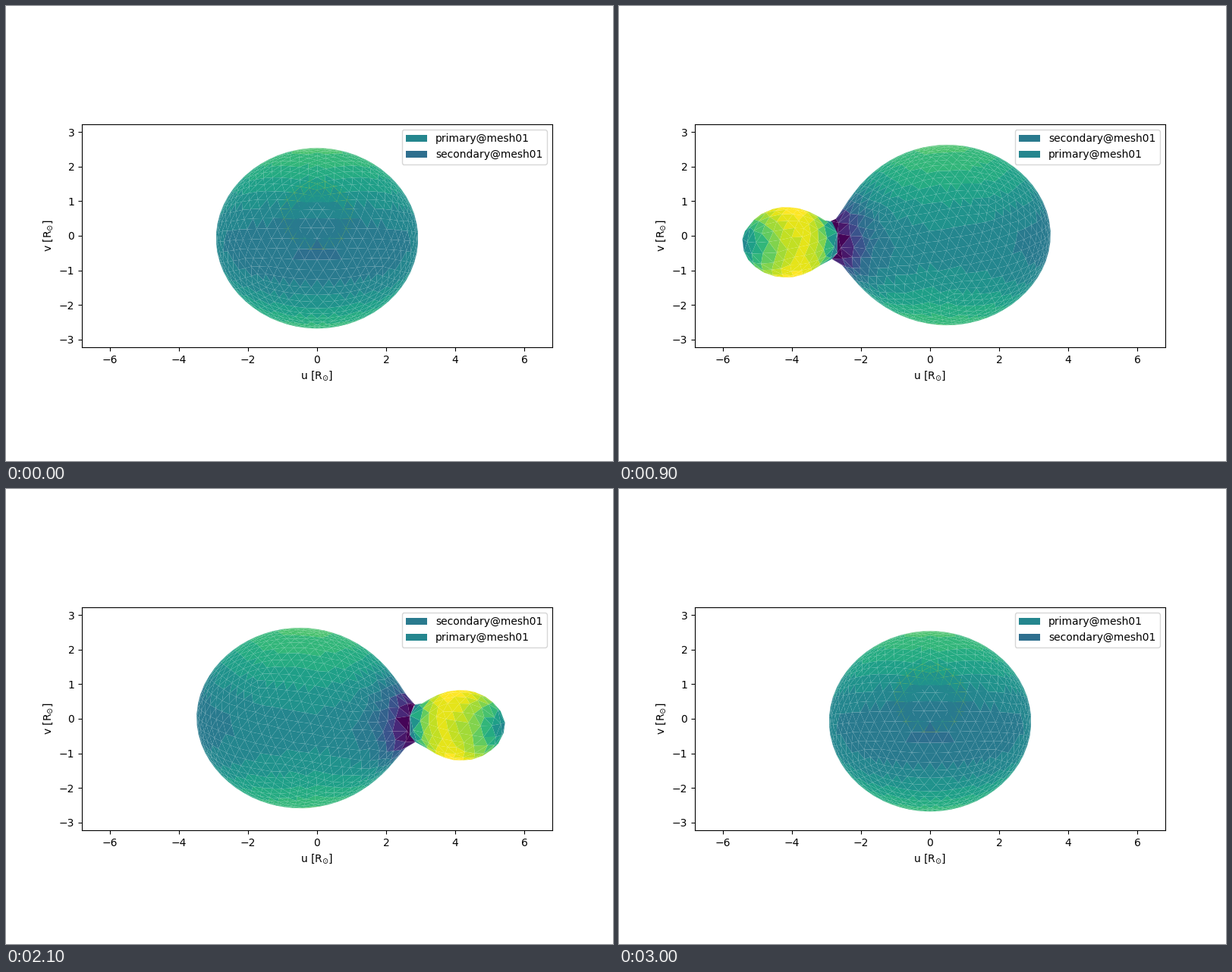
A matplotlib script for the animation above (3.1 s loop, 800 by 600 pixels).

```python
from itertools import combinations

import matplotlib.pyplot as plt
import numpy as np
from matplotlib.animation import FuncAnimation
from matplotlib.collections import PolyCollection
from matplotlib.patches import Patch

FRAMES = 31
STEPS = 30            # frames per orbit
SEP = 4.83            # separation in solar radii
Q = 0.112             # mass ratio, small star / big star
OMEGA = 1.95          # potential of the common envelope
NECK = 0.72           # where the envelope is split in two
INCL = np.radians(82)
CMAP = plt.get_cmap("viridis")


def potential(p):
    x, y, z = p.T
    r1 = np.sqrt(x**2 + y**2 + z**2)
    r2 = np.sqrt((x - 1)**2 + y**2 + z**2)
    return 1 / r1 + Q / r2 - Q * x + 0.5 * (1 + Q) * (x**2 + y**2)


def gravity(p):
    x, y, z = p.T
    k1 = (x**2 + y**2 + z**2)**-1.5
    k2 = Q * ((x - 1)**2 + y**2 + z**2)**-1.5
    spin = 1 + Q
    gx = -x * k1 - (x - 1) * k2 - Q + spin * x
    gy = y * (spin - k1 - k2)
    gz = -z * (k1 + k2)
    return np.sqrt(gx**2 + gy**2 + gz**2)


def reach(origin, rays, limit):
    """Distance along each ray to the envelope, at most limit."""
    lo, hi = np.zeros(len(rays)), limit.copy()
    for _ in range(40):
        mid = (lo + hi) / 2
        inside = potential(origin + mid[:, None] * rays) > OMEGA
        lo, hi = np.where(inside, mid, lo), np.where(inside, hi, mid)
    return hi


def sphere(n, rng):
    """Geodesic sphere, regular at -x and slightly uneven elsewhere."""
    g = (1 + 5**0.5) / 2
    base = [np.roll((0, s, t * g), k)
            for k in range(3) for s in (-1, 1) for t in (-1, 1)]
    points, faces = [], []
    for a, b, c in combinations(base, 3):
        if max(np.linalg.norm(a - b), np.linalg.norm(b - c),
               np.linalg.norm(c - a)) > 2.1:
            continue
        index = {}
        for i in range(n + 1):
            for j in range(n + 1 - i):
                index[i, j] = len(points)
                points.append(a + (b - a) * i / n + (c - a) * j / n)
        for i in range(n):
            for j in range(n - i):
                faces.append((index[i, j], index[i + 1, j], index[i, j + 1]))
                if i + j < n - 1:
                    faces.append((index[i + 1, j], index[i + 1, j + 1],
                                  index[i, j + 1]))
    points, same = np.unique(np.round(points, 6), axis=0, return_inverse=True)
    faces = same.ravel()[np.array(faces)]

    front = np.ones(3) / 3**0.5
    side = np.array([-1, 1 - g, g])
    side = side / np.linalg.norm(side)
    points = points @ np.array([-front, side, np.cross(front, side)]).T
    points /= np.linalg.norm(points, axis=1)[:, None]
    uneven = 0.09 / n * (1 + points[:, :1]) / 2
    points = points + uneven * rng.normal(size=points.shape)
    return points / np.linalg.norm(points, axis=1)[:, None], faces


def shade(value):
    return CMAP(np.clip(np.round(value * 20) / 20 + 0.01, 0, 1))


def build_star(center, n, far, offset, rng):
    """Triangles and colours of one half of the envelope."""
    rays, faces = sphere(n, rng)
    origin = np.array([center, 0.0, 0.0])
    to_neck = NECK - center
    ahead = rays[:, 0] * np.sign(to_neck)
    limit = np.minimum(far, abs(to_neck) / np.maximum(ahead, 1e-6))
    points = origin + reach(origin, rays, limit)[:, None] * rays

    # Points that would run through the neck are moved to its rim.
    cut = np.abs(points[:, 0] - NECK) < 1e-6
    radial = points[cut] * [0, 1, 1]
    radial /= np.maximum(np.linalg.norm(radial, axis=1), 1e-9)[:, None]
    neck = np.array([NECK, 0.0, 0.0])
    rim = reach(neck, radial, np.full(cut.sum(), 0.3))
    points[cut] = neck + rim[:, None] * radial
    faces = faces[~cut[faces].all(axis=1)]

    tri = points[faces]
    normal = np.cross(tri[:, 1] - tri[:, 0], tri[:, 2] - tri[:, 0])
    inward = (normal * (tri.mean(axis=1) - origin)).sum(axis=1) < 0
    tri[inward] = tri[inward][:, ::-1]
    warmth = 0.47 * np.log(gravity(points)) + offset
    colors = shade(warmth[faces].mean(axis=1))
    return (tri - [Q / (1 + Q), 0, 0]) * SEP, colors


def project(star, angle):
    """Visible triangles, the farthest first."""
    tri, colors = star
    x, y, z = np.moveaxis(tri, -1, 0)
    s, c = np.sin(angle), np.cos(angle)
    u = -x * s - y * c
    away = x * c - y * s
    v = z * np.sin(INCL) + away * np.cos(INCL)
    near = (z * np.cos(INCL) - away * np.sin(INCL)).mean(axis=1)
    area = ((u[:, 1] - u[:, 0]) * (v[:, 2] - v[:, 0])
            - (u[:, 2] - u[:, 0]) * (v[:, 1] - v[:, 0]))
    order = np.argsort(near)
    order = order[area[order] > 0]
    return np.stack([u, v], axis=-1)[order], colors[order]


rng = np.random.default_rng(4)
big = build_star(0.0, 11, 0.8, 0.104, rng)
small = build_star(1.0, 4, 0.33, 0.55, rng)

fig, ax = plt.subplots(figsize=(8, 6), dpi=100)
ax.set_aspect("equal")
ax.set_xlim(-6.81, 6.81)
ax.set_ylim(-3.23, 3.23)
ax.set_xlabel(r"u [$\mathrm{R_{\odot}}$]")
ax.set_ylabel(r"v [$\mathrm{R_{\odot}}$]")
mesh = PolyCollection([], linewidths=0, edgecolors="none")
ax.add_collection(mesh, autolim=False)


def swatch(label, value):
    return Patch(facecolor=CMAP(value), linewidth=0, label=label)


def update(frame):
    turn = frame % STEPS
    angle = 2 * np.pi * turn / STEPS
    behind = np.cos(angle) > 0
    stars = [small, big] if behind else [big, small]
    parts = [project(star, angle) for star in stars]
    mesh.set_verts(np.concatenate([p[0] for p in parts]))
    mesh.set_facecolor(np.concatenate([p[1] for p in parts]))

    half = min(turn, STEPS - turn)
    tone = 0.36 if half < 7.5 else 0.41 if half < 12 else 0.66
    keys = [swatch("primary@mesh01", 0.46), swatch("secondary@mesh01", tone)]
    ax.legend(handles=keys if behind else keys[::-1], loc="upper right")
    return mesh,


anim = FuncAnimation(fig, update, frames=FRAMES, interval=100,
                     repeat=True, repeat_delay=0, blit=False)
plt.show()
```
